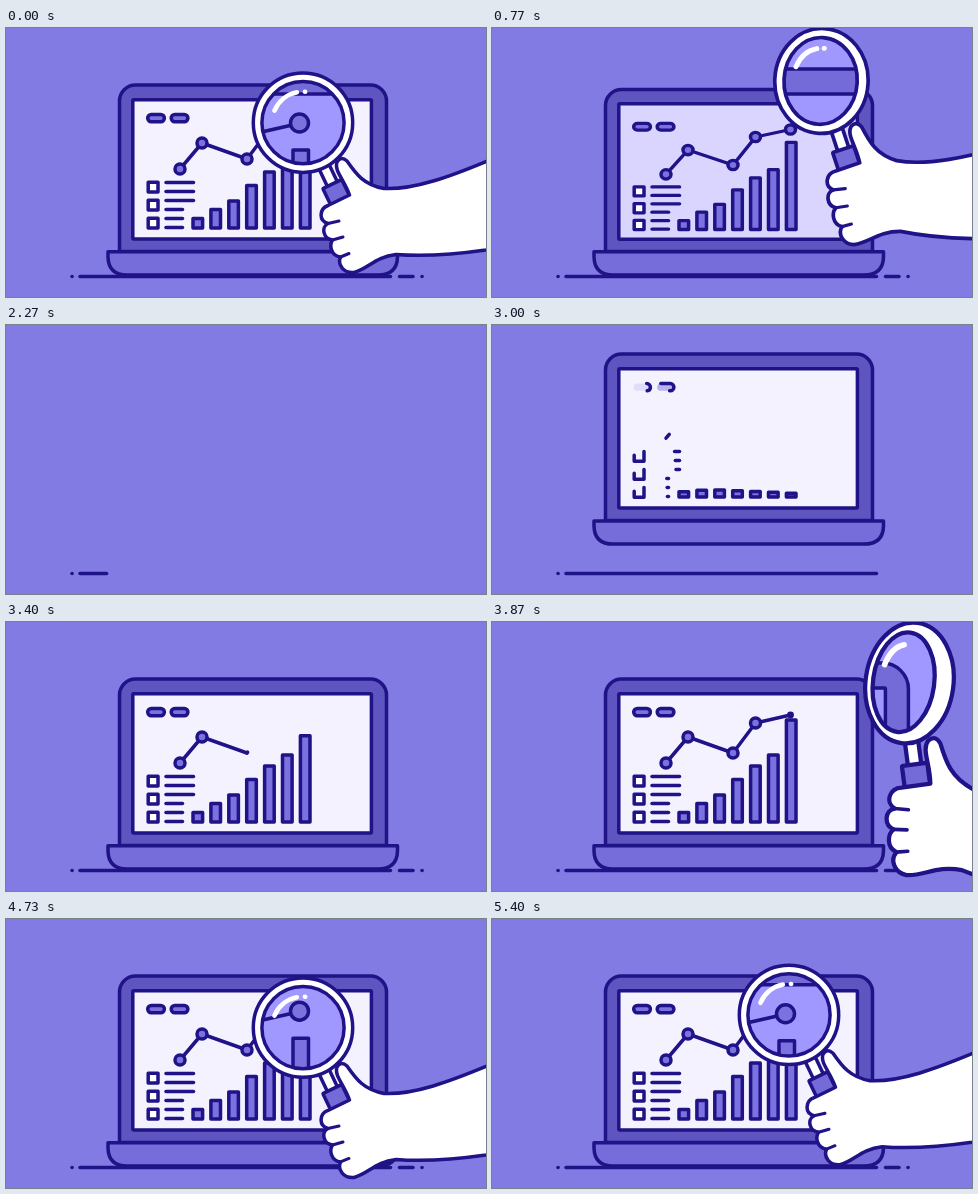
Recreate the animation shown at these times as an HTML page with a canvas. Size 480 by 269 pixels, loop 5.43 s.

```html
<!DOCTYPE html>
<html lang="en">
<head>
<meta charset="utf-8">
<title>Chart under a magnifier</title>
<style>
  html, body { margin: 0; width: 100%; height: 100%; overflow: hidden; background: #837be4; }
  canvas { display: block; width: 480px; height: 269px; }
</style>
</head>
<body>
<canvas id="stage"></canvas>
<script>
const LOOP = 5430;
const INK = '#1f1387', BG = '#837be4', FILL = '#7b72df', LID = '#5f55c1',
      BASE = '#766cda', BAND = '#746ad8', PAPER = '#f4f2ff', GLASS = '#a098ff', WHITE = '#ffffff';
const STROKE = 3.5;

const canvas = document.getElementById('stage');
const ctx = canvas.getContext('2d');
const dpr = window.devicePixelRatio || 1;
canvas.width = 480 * dpr;
canvas.height = 269 * dpr;

const POINTS = [[174, 141], [196, 115], [241, 131], [263.5, 101], [298.5, 93]];
const BAR_HEIGHTS = [9.5, 18.5, 27, 42.5, 56, 67, 102];

const ramp = (t, from, to) => Math.max(0, Math.min(1, (t - from) / (to - from)));
const smooth = p => p * p * (3 - 2 * p);
const easeOut = p => 1 - (1 - p) ** 2;

function shape(path, fill, width = STROKE) {
  if (fill) { ctx.fillStyle = fill; ctx.fill(path); }
  if (width) { ctx.strokeStyle = INK; ctx.lineWidth = width; ctx.stroke(path); }
}

function box(x, y, w, h, r = 0) {
  const p = new Path2D();
  p.roundRect(x, y, w, h, r);
  return p;
}

function oval(x, y, rx, ry = rx) {
  const p = new Path2D();
  p.ellipse(x, y, rx, ry, 0, 0, Math.PI * 2);
  return p;
}

function line(x1, y1, x2, y2, width = STROKE) {
  shape(new Path2D(`M${x1} ${y1}L${x2} ${y2}`), null, width);
}

// Stroke a share p of a path, beginning at share start
function trim(path, length, p, start = 0) {
  if (p <= 0) return;
  ctx.save();
  if (p < 1) {
    ctx.setLineDash([p * length, length * 2]);
    ctx.lineDashOffset = -start * length;
  }
  shape(path);
  ctx.restore();
}

// The floor line is wiped from the left, then grows back from the left
function ground(t) {
  const from = t < 2100 ? 62 + 358 * smooth(ramp(t, 1560, 2090)) : 62;
  const to = t < 2100 ? 420 : 62 + 358 * easeOut(ramp(t, 2205, 3350));
  for (const [a, b] of [[66, 66.1], [74, 384.5], [393.5, 407], [416, 416.1]]) {
    const x1 = Math.max(a, from), x2 = Math.min(b, to - 1.5);
    if (x2 > x1) line(x1, 248.5, x2, 248.5);
  }
}

function pill(x, p, start) {
  const path = new Path2D(`M${x + 4} 86.500h9.500a3.600 3.600 0 0 1 0 7.200h-9.500a3.600 3.600 0 0 1 0-7.200z`);
  ctx.save();
  ctx.globalAlpha = smooth(p);
  shape(path, FILL, 0);
  ctx.restore();
  trim(path, 42, p, start * (1 - p));
}

function chart(t) {
  const now = t < 2000 ? LOOP : t;
  const prog = (start, dur) => ramp(now, start, start + dur);

  pill(141.3, prog(2950, 200), 0.3);
  pill(164.8, prog(2900, 200), 0);

  for (let i = 0; i < 3; i++) {
    const p = prog(2870, 200);
    const square = new Path2D(`M152 ${154.3 + i * 18}v9.800h-9.800v-9.800z`);
    if (p >= 1) shape(square, WHITE, 0);
    trim(square, 39.2, p);
  }
  for (let i = 0; i < 6; i++) {
    const right = i < 3 ? 187.5 : 176.5, y = 154.5 + i * 9;
    const p = prog(2920 + i * 7, 300);
    if (p > 0) line(right - (right - 160) * smooth(p), y, right, y);
  }

  BAR_HEIGHTS.forEach((full, i) => {
    const p = prog(2910 + i * 3, 120 + full * 5);
    if (p <= 0) return;
    const shrink = t < 2000 ? 1 - smooth(ramp(t, 840 - i * 25, 1290 - i * 25)) : 1;
    const h = Math.max(2, full * smooth(p) * shrink);
    shape(box(187 + i * 17.9, 200 - h, 9.6, h), FILL);
  });

  const drawn = prog(2970, 850) * 4;
  for (let i = 0; i < drawn && i < 4; i++) {
    const p = Math.min(1, drawn - i);
    const [x, y] = POINTS[i], [nx, ny] = POINTS[i + 1];
    line(x, y, x + (nx - x) * p, y + (ny - y) * p);
  }
  POINTS.forEach(([x, y], i) => {
    const p = prog(3020 + i * 200, 130);
    if (p > 0) shape(oval(x, y, 5 * smooth(p)), FILL);
  });
}

// Vertical offset: sinks behind the floor, leaps out, drops back
function laptopOffset(t) {
  if (t < 2000) return 32 * ramp(t, 1220, 1580) ** 2;
  if (t < 2870) return 32 - 73 * easeOut(ramp(t, 2300, 2870));
  return -41 * (1 - ramp(t, 2870, 3150) ** 1.5);
}

function lidOpening(t) {
  return t < 2000 ? 1 - ramp(t, 680, 1230) ** 2 : easeOut(ramp(t, 2420, 2800));
}

function laptop(t) {
  const dy = laptopOffset(t), k = lidOpening(t);
  if (dy > 28) return;
  ctx.save();
  ctx.beginPath();
  ctx.rect(0, 0, 480, 250);
  ctx.clip();
  ctx.translate(0, dy);
  if (k > 0.02) {
    const Y = y => 223.5 - (223.5 - y) * k;
    const top = Y(57), r = Math.min(16, 223.5 - top);
    shape(box(113.5, top, 267, 223.5 - top, [r, r, 0, 0]), LID);
    const screen = box(126.8, Y(71.7), 238.6, Y(211) - Y(71.7), 1);
    shape(screen, PAPER, 0);
    ctx.save();
    ctx.globalAlpha = Math.min(0.7, (1 - k) * 12);
    shape(screen, GLASS, 0);
    ctx.restore();
    shape(screen);

    const squash = k * (1 - 1.47 * k * (1 - k));
    ctx.save();
    ctx.translate(0, 223 * (1 - squash));
    ctx.scale(1, squash);
    chart(t);
    ctx.restore();
  }
  shape(new Path2D('M102 223.800H391.500V229Q391 247 372 247H121Q102.500 247 102 229Z'), BASE);
  ctx.restore();
}

// Enlarged laptop seen through the glass
function glassView(cx, cy) {
  ctx.translate(-0.075 * (cx - 297), -0.2 * Math.max(0, cy - 95));
  shape(box(-100, 41, 525, 400, 26), BAND);
  shape(box(-80, 66, 482, 400, 1), GLASS);
  shape(box(287, 122, 15.5, 90), FILL);
  line(238, 108, 293, 95.5);
  shape(oval(293.5, 95, 9), FILL);
}

const HAND = new Path2D(
  'M640 60C580 90 530 112 480 133.500C445 148 408 162 378 160.500' +
  'C358 157 350 146 341 133Q335 127.500 331 134C328 143 338 151 343.500 167' +
  'L322 177.500C313 181 312.500 193 322 195.500C315 199 317 211 326.500 212' +
  'C323 217 325 228 334.500 229C331 237 338 245.500 348 244.500' +
  'C362 241 369 229 390 226.500C422 229 452 226 480 222C530 213 580 200 640 180Z');

// One swing value drives distance, turn, size and foreshortening of the arm
function armPose(t) {
  const leaving = t < 2000;
  const swing = leaving ? 0.4 * (t / 770) ** 4 : 2.37 * (1 - ramp(t, 3450, 4650)) ** 2;
  const lift = leaving ? 34 * (t / 770) ** 2 : 11 * swing;
  const bob = 15 * Math.sin(Math.PI * ramp(t, 4300, LOOP));
  return {
    x: 330 + 94 * swing ** 1.5,
    y: 164 + bob - lift,
    angle: 18 * swing * Math.PI / 180,
    scale: 1 + 0.22 * swing ** 1.5,
    squash: Math.max(0.3, 1 - 0.39 * swing)
  };
}

function lens(angle, squash, cx, cy) {
  const turn = 1 - squash;
  const rx = 41.1 * squash;
  const opening = oval(0, 0, rx, 41.1);
  ctx.save();
  ctx.rotate(turn * 0.35 - angle);
  shape(oval(32 * turn ** 2, 0, rx + 8.6 + 6 * turn, 49.7), WHITE);

  ctx.save();
  ctx.clip(opening);
  shape(opening, GLASS, 0);
  ctx.setTransform(dpr, 0, 0, dpr, 0, 0);
  glassView(cx, cy);
  ctx.restore();
  shape(opening);

  const glint = (from, to) => {
    ctx.beginPath();
    ctx.ellipse(0, 0, 31 * squash, 31, 0, from, to);
    ctx.strokeStyle = WHITE;
    ctx.lineWidth = 4.6;
    ctx.stroke();
  };
  glint(-2.74, -1.77);
  if (squash > 0.75) glint(-1.51, -1.5);
  ctx.restore();
}

function arm(t) {
  if (t > 1250 && t < 3450) return;
  const { x, y, angle, scale, squash } = armPose(t);
  if (x > 590) return;
  const cos = Math.cos(angle), sin = Math.sin(angle);
  const cx = x + scale * (69 * sin - 33 * cos);
  const cy = y - scale * (33 * sin + 69 * cos);

  ctx.save();
  ctx.translate(x, y);
  ctx.rotate(angle);
  ctx.scale(scale, scale);
  ctx.translate(-330, -164);

  ctx.save();
  ctx.translate(297, 94.7);
  ctx.save();
  ctx.rotate(-0.446);
  shape(box(-5.5, 44, 11, 28), WHITE);
  shape(box(-10.5, 68, 21, 24, 1), BAND);
  ctx.restore();
  lens(angle, squash, cx, cy);
  ctx.restore();

  shape(HAND, WHITE);
  line(322, 195.5, 333, 193, 3);
  line(326.5, 212, 337, 209, 3);
  line(334.5, 229, 343, 225.5, 3);
  ctx.restore();
}

function draw(t) {
  ctx.setTransform(dpr, 0, 0, dpr, 0, 0);
  ctx.lineCap = ctx.lineJoin = 'round';
  ctx.fillStyle = BG;
  ctx.fillRect(0, 0, 480, 269);
  laptop(t);
  ground(t);
  arm(t);
}

const start = performance.now();
function tick() {
  draw((performance.now() - start) % LOOP);
  requestAnimationFrame(tick);
}
tick();
</script>
</body>
</html>
```
